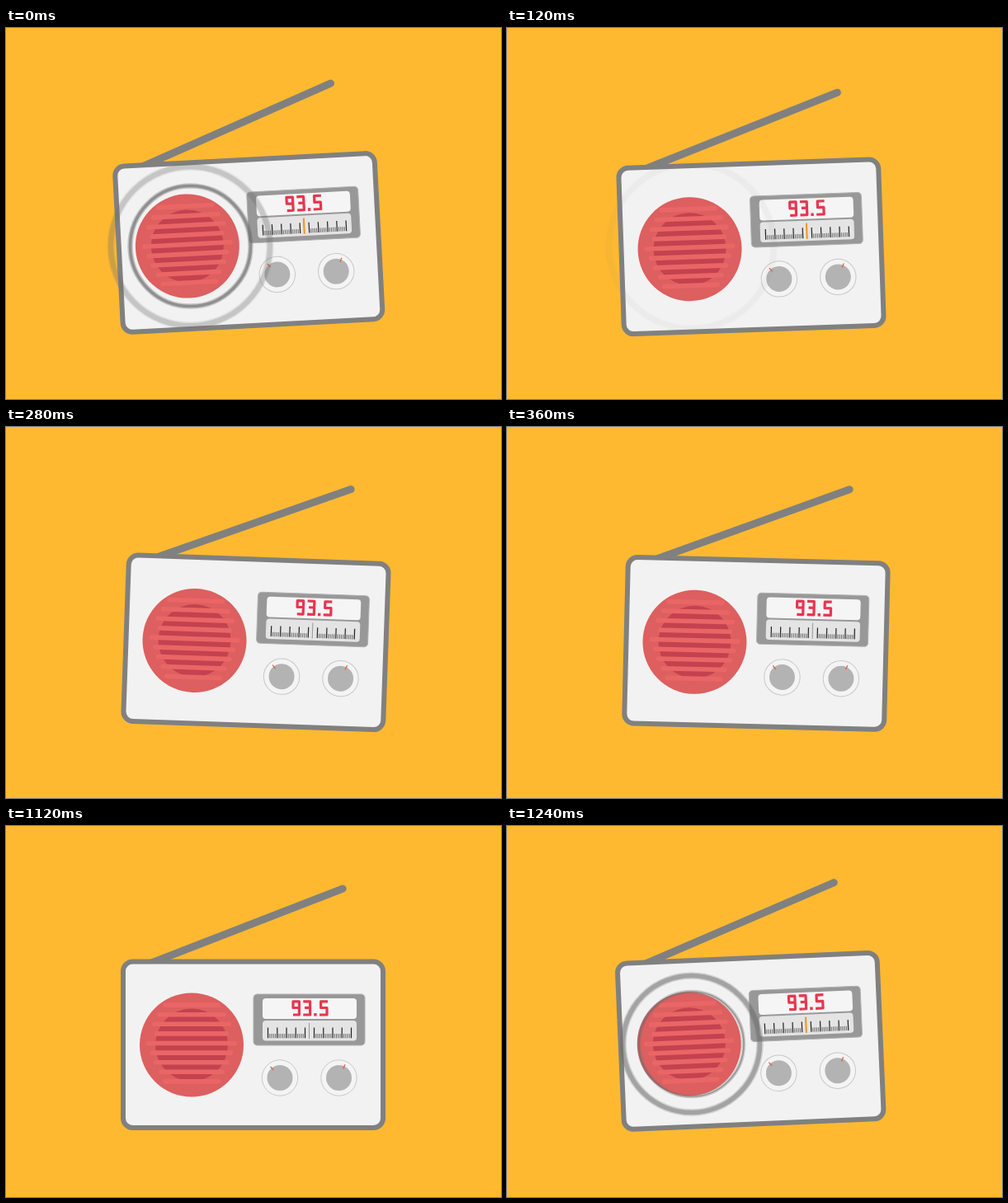
An HTML page with a canvas that plays this animation: 600x450 px, repeating every 1.28 s.

```html
<!DOCTYPE html>
<html lang="en">
<head>
<meta charset="utf-8">
<title>Hopping radio</title>
<style>
  html, body { margin: 0; width: 100%; height: 100%; overflow: hidden; background: #ffb931; }
  canvas { display: block; width: 600px; height: 450px; }
</style>
</head>
<body>
<canvas id="stage" width="600" height="450" role="img" aria-label="Radio tuned to 93.5"></canvas>
<script>
const ctx = document.getElementById('stage').getContext('2d');
const LOOP = 1280, STEP = 40, HOP_START = 1120;
const GRAY = '#808080', PAPER = '#f2f2f2', RED = '#e8364f';

// Keys are [time since the hop starts, value]
const tilt = [[0, 0], [40, -0.5], [120, -2.45], [160, -3], [200, -2.9], [280, -2],
  [360, 0], [440, 2], [470, 2.1], [600, 0]];
const lift = [[0, 0], [120, -4.4], [160, -5], [280, 0], [360, 0], [440, -4], [470, -4.3], [600, 0]];
const whip = [[0, 0], [120, 0.35], [160, 0.35], [280, 1.5], [330, 1.9], [360, 1.75], [440, -0.1], [600, 0]];
const ringRadius = [[0, 63.5], [40, 73], [80, 83], [120, 96.5], [160, 100]];
const ringAlpha = [[0, 0.8], [40, 0.85], [80, 0.65], [120, 0.34], [160, 0.05]];
const ringWidth = [[0, 3], [40, 5], [80, 7], [160, 8]];

// Smooth curve through the keys, flat at every peak
function sample(keys, t) {
  const last = keys.length - 1;
  if (t <= keys[0][0]) return keys[0][1];
  if (t >= keys[last][0]) return keys[last][1];
  const slope = i => (keys[i + 1][1] - keys[i][1]) / (keys[i + 1][0] - keys[i][0]);
  const tangent = i => {
    if (i === 0 || i === last) return 0;
    const a = slope(i - 1), b = slope(i);
    return a * b <= 0 ? 0 : 2 * a * b / (a + b);
  };
  let i = 0;
  while (t > keys[i + 1][0]) i++;
  const h = keys[i + 1][0] - keys[i][0], s = (t - keys[i][0]) / h, r = 1 - s;
  return r * r * (1 + 2 * s) * keys[i][1] + s * s * (3 - 2 * s) * keys[i + 1][1]
    + h * s * r * (r * tangent(i) - s * tangent(i + 1));
}

const rad = deg => deg * Math.PI / 180;

function box(x, y, w, h, r, fill, stroke, width) {
  ctx.beginPath();
  ctx.roundRect(x, y, w, h, r);
  paint(fill, stroke, width);
}

function disc(x, y, r, fill, stroke, width) {
  ctx.beginPath();
  ctx.arc(x, y, r, 0, 2 * Math.PI);
  paint(fill, stroke, width);
}

function line(points, stroke, width) {
  ctx.beginPath();
  points.forEach(([x, y]) => ctx.lineTo(x, y));
  paint(null, stroke, width);
}

function paint(fill, stroke, width) {
  if (fill) { ctx.fillStyle = fill; ctx.fill(); }
  if (stroke) { ctx.strokeStyle = stroke; ctx.lineWidth = width; ctx.stroke(); }
}

function drawAntenna(angle) {
  ctx.save();
  ctx.translate(184, 163);
  ctx.rotate(rad(angle - 21.2));
  ctx.lineCap = 'round';
  line([[-11, 0], [240.5, 0]], GRAY, 9);
  ctx.restore();
}

function drawSpeaker() {
  disc(225, 265.5, 63, '#dd5f5f');
  disc(225, 265.5, 44, '#c4424f');
  [35, 42, 48, 45, 55, 50, 46, 40, 35].forEach((half, i) =>
    box(225 - half, 214.3 + i * 11.6, half * 2, 5.6, 2.8, '#ea6666'));
}

function drawFrequency() {
  ctx.save();
  ctx.lineJoin = 'round';
  const pen = points => line(points, RED, 3.2);
  pen([[348, 229], [355.4, 229], [355.4, 212.8], [348, 212.8], [348, 220.5], [355, 220.5]]);
  pen([[360.3, 212.8], [368.6, 212.8], [368.6, 229], [360.3, 229]]);
  pen([[362, 220.5], [368.6, 220.5]]);
  pen([[390, 212.8], [381.6, 212.8], [381.6, 220.5], [389, 220.5], [389, 229], [380, 229]]);
  ctx.fillStyle = RED;
  ctx.fillRect(373.2, 227, 3.4, 3.6);
  ctx.restore();
}

function drawScale(glow) {
  for (const start of [317.5, 373.5]) {
    for (let i = 0; i <= 20; i++) {
      const major = i % 5 === 0, x = start + i * 2.25;
      line([[x, major ? 244.5 : 252], [x, 257.3]], major ? '#222' : '#666', major ? 1.2 : 1);
    }
  }
  line([[367.5, 239], [367.5, 258]], '#999', 1);
  ctx.globalAlpha = glow;
  line([[367.5, 239], [367.5, 258]], '#f7941e', 2);
  ctx.globalAlpha = 1;
}

function drawKnob(x, angle) {
  disc(x, 305.5, 21.7, '#f4f4f4', '#c8c8c8', 1);
  disc(x, 305.5, 15.5, '#b3b3b3');
  ctx.save();
  ctx.translate(x, 305.5);
  ctx.rotate(rad(angle));
  line([[0, -17.8], [0, -12.2]], '#e2603f', 1.3);
  ctx.restore();
}

function drawRing(age) {
  if (age < 0 || age > 160) return;
  const r = sample(ringRadius, age), w = sample(ringWidth, age), alpha = sample(ringAlpha, age);
  ctx.globalAlpha = alpha * 0.4;
  disc(223.5, 264.6, r, null, '#6c6c6c', w + 1.5);
  ctx.globalAlpha = alpha * 0.7;
  disc(223.5, 264.6, r, null, '#6c6c6c', w - 1.5);
  ctx.globalAlpha = 1;
}

function draw(time) {
  const t = (Math.floor(time / STEP) * STEP + LOOP - HOP_START) % LOOP;
  const angle = sample(tilt, t);
  ctx.fillStyle = '#ffb931';
  ctx.fillRect(0, 0, 600, 450);

  // The body rocks around the middle of its base
  ctx.save();
  ctx.translate(299.5, 365.5 + sample(lift, t));
  ctx.rotate(rad(angle));
  ctx.translate(-299.5, -365.5);
  drawAntenna(sample(whip, t));
  box(142, 164.5, 315, 201.5, 11.5, PAPER, GRAY, 6);
  drawSpeaker();
  box(300, 204, 135, 62, 4.5, '#989898', '#b0b0b0', 1);
  box(311, 209, 114, 25, 4, '#f5f5f5');
  box(311, 236, 114, 24.5, 4, '#e4e4e4');
  drawFrequency();
  drawScale(Math.min(1, Math.max(0, -angle / 2)));
  drawKnob(332, -40);
  drawKnob(403.5, 25);
  ctx.restore();

  drawRing(t - 40);
  drawRing(t - 120);
}

function tick() {
  draw(performance.now() % LOOP);
  requestAnimationFrame(tick);
}
tick();
</script>
</body>
</html>
```
